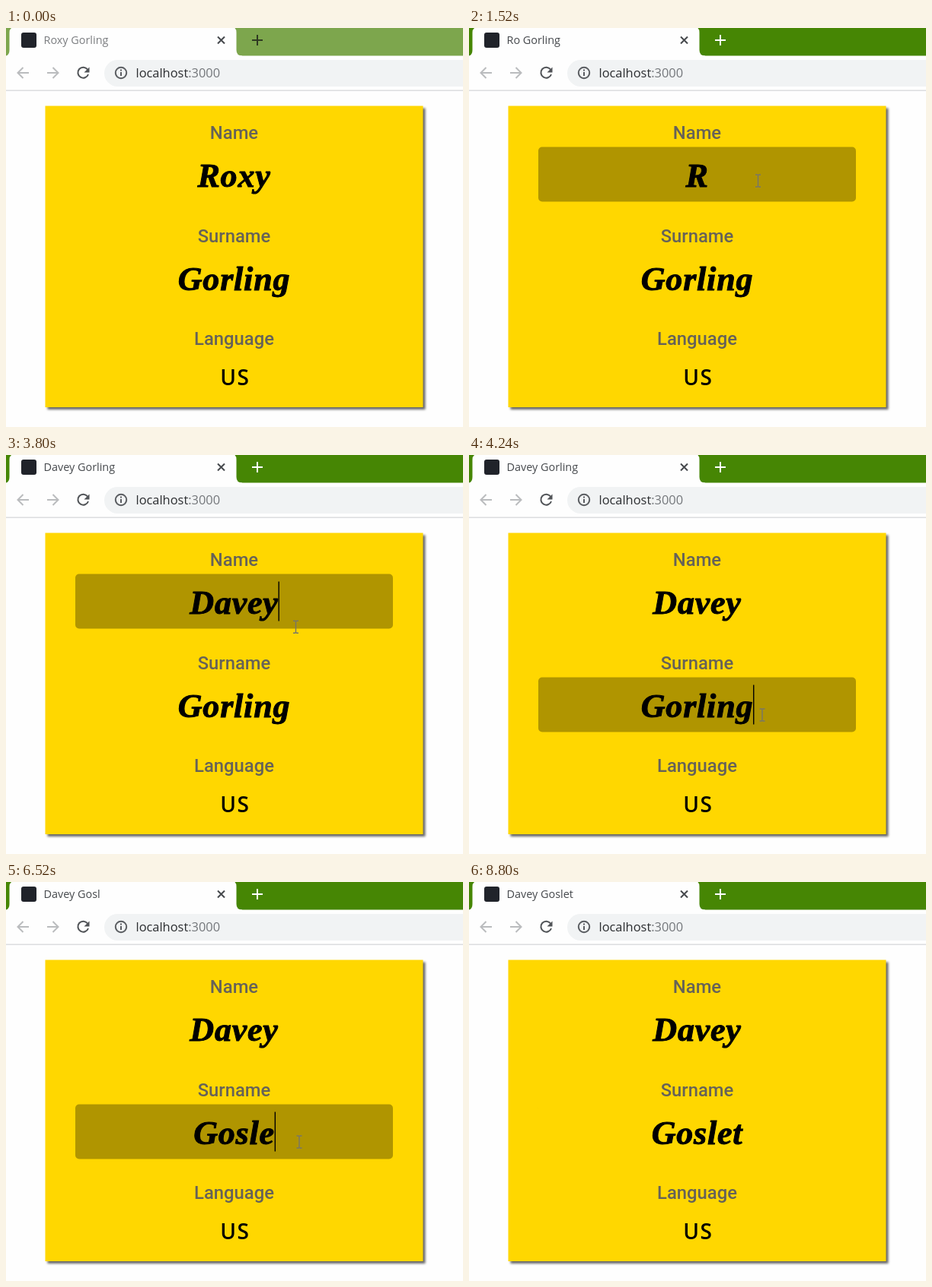
Write an HTML page that moves like this. It is 600x525 px and loops after 8920 ms.

```html
<!DOCTYPE html>
<html lang="en">
<head>
<meta charset="utf-8">
<style>
  html, body { margin: 0; width: 100%; height: 100%; overflow: hidden; background: #fefefe; }
  svg { display: block; width: 600px; height: 525px; }
  .tab { font: 14.4px "Open Sans", "Noto Sans", sans-serif; }
  .url { font: 16.4px "Open Sans", "Noto Sans", sans-serif; }
  .label { font: 500 23.8px Roboto, sans-serif; fill: #666258; text-anchor: middle; }
  .value { font: italic bold 44px "Liberation Serif", serif; letter-spacing: .8px; text-anchor: middle; stroke: #000; stroke-width: 1; }
  .lang { font: 600 28px "Open Sans", "Noto Sans", sans-serif; letter-spacing: 1.4px; text-anchor: middle; }
  .line { fill: none; stroke-width: 2; }
  .card { fill: #ffd700; filter: drop-shadow(3px 3px 1.5px #666); }
</style>
</head>
<body>
<svg viewBox="0 0 600 525">
  <rect id="bar" width="600" height="36.5"/>
  <path fill="#fefefe" d="M0 37Q4.500 35 4.500 29V6Q4.500 2 7 0H300.500Q302.500 2 302.500 6V29Q302.500 36.500 310 36.500V37Z"/>
  <rect x="20" y="6" width="20" height="20" rx="3" fill="#20232a"/>
  <text id="title" class="tab" x="49.5" y="21"/>
  <path class="line" stroke="#45484c" d="M278 11.5l9 9m0-9l-9 9"/>
  <path id="plus" class="line" d="M323 16h14m-7-7v14"/>

  <rect y="81.5" width="600" height="1.5" fill="#dcdde0"/>
  <rect x="129" y="42" width="500" height="35" rx="17.5" fill="#f1f3f4"/>
  <g class="line" stroke="#babcbe">
    <path d="M30 59H15.500m7-7l-7 7 7 7"/>
    <path d="M54 59H68.500m-7-7l7 7-7 7"/>
  </g>
  <path class="line" stroke="#505357" d="M107 54.500A7 7 0 1 0 108 61"/>
  <path fill="#505357" d="M109.500 51.500v7h-7z"/>
  <circle class="line" stroke="#5a5d61" cx="151" cy="59" r="7.200"/>
  <path class="line" stroke="#5a5d61" d="M151 58v5m0-8.500v2"/>
  <text class="url" x="170.500" y="65" fill="#2b2d30">localhost<tspan fill="#74777b">:3000</tspan></text>

  <rect class="card" x="51.500" y="102.500" width="496" height="396.500"/>
  <text class="label" x="299.500" y="145.500">Name</text>
  <text class="label" x="299.500" y="281.500">Surname</text>
  <text class="label" x="299.500" y="417">Language</text>
  <g id="fields"></g>
  <text class="lang" x="300.700" y="470">US</text>
  <path id="pointer" fill="none" stroke="#77766a" stroke-width="1.400"
    d="M-3.500-8H-1L0-7 1-8H3.500M0-7V7M-3.500 8H-1L0 7 1 8H3.500"/>
</svg>
<script>
const LOOP = 8920, BLINK = 534, CENTER = 299.5;
const $ = id => document.getElementById(id);

const fields = [
  { top: 156.5, show: 200, hide: 4060, fade: 160, focus: 516, blur: 4065,
    edits: [[0, 'Roxy'], [1280, 'Rox'], [1350, 'Ro'], [1450, 'R'], [1590, ''],
            [2400, 'D'], [2680, 'Da'], [2920, 'Dav'], [3080, 'Dave'], [3220, 'Davey']] },
  { top: 292.5, show: 3900, hide: 7560, fade: 300, focus: 4065, blur: 7560,
    edits: [[0, 'Gorling'], [4880, 'Gorlin'], [5040, 'Gorli'], [5160, 'Gorl'], [5280, 'Gor'], [5480, 'Go'],
            [5960, 'Gos'], [6210, 'Gosl'], [6380, 'Gosle'], [6820, 'Goslet']] }
];

// start, end, from, to
const moves = [
  [40, 460, [560, 216], [379.5, 201]],
  [3720, 4020, [379.5, 201], [385, 342]],
  [7240, 7640, [385, 342], [376, 446]]
];

const ramp = (t, from, length) => Math.min(1, Math.max(0, (t - from) / length));
const smooth = k => k * k * (3 - 2 * k);
const textAt = (edits, t) => edits.filter(e => e[0] <= Math.max(0, t)).pop()[1];

function add(name, attrs) {
  const el = document.createElementNS('http://www.w3.org/2000/svg', name);
  for (const key in attrs) el.setAttribute(key, attrs[key]);
  return $('fields').appendChild(el);
}

for (const f of fields) {
  f.box = add('rect', { x: 91, y: f.top, width: 417, height: 72, rx: 5 });
  f.text = add('text', { class: 'value', x: CENTER, y: f.top + 52.5 });
  f.caret = add('rect', { y: f.top + 10, width: 1.4, height: 52 });
}

function pointerAt(t) {
  const [start, end, a, b] = moves.filter(m => m[0] <= t).pop() || moves[0];
  const k = smooth(ramp(t, start, end - start));
  return a.map((v, i) => v + (b[i] - v) * k);
}

function drawField(f, t) {
  const shade = smooth(ramp(t, f.show, 200)) * (1 - smooth(ramp(t, f.hide, f.fade)));
  f.box.setAttribute('fill-opacity', 0.31 * shade);
  const value = textAt(f.edits, t);
  if (f.text.textContent !== value) f.text.textContent = value;
  const lit = t >= f.focus && t < f.blur && Math.floor((t - f.focus) / BLINK) % 2 === 0;
  f.caret.setAttribute('visibility', lit ? 'visible' : 'hidden');
  const width = value ? f.text.getComputedTextLength() : 0;
  f.caret.setAttribute('x', CENTER + width / 2 - 0.2);
}

function draw(t) {
  const active = t >= fields[0].focus;
  $('bar').setAttribute('fill', active ? '#468604' : '#7da64d');
  $('plus').setAttribute('stroke', active ? '#fff' : '#2f3a22');
  $('title').setAttribute('fill', active ? '#45484c' : '#7b7d80');

  fields.forEach(f => drawField(f, t));
  // The tab title trails the typing.
  const lag = t < 2000 ? 160 : 260;
  $('title').textContent = fields.map(f => textAt(f.edits, t - lag)).join(' ').trim();

  const [x, y] = pointerAt(t);
  const over = t >= 40 && x < 508 && fields.some(f => y > f.top && y < f.top + 72);
  $('pointer').setAttribute('visibility', over ? 'visible' : 'hidden');
  $('pointer').setAttribute('transform', `translate(${x} ${y})`);
}

const began = performance.now();
function tick() {
  draw((performance.now() - began) % LOOP);
  requestAnimationFrame(tick);
}
tick();
</script>
</body>
</html>
```
